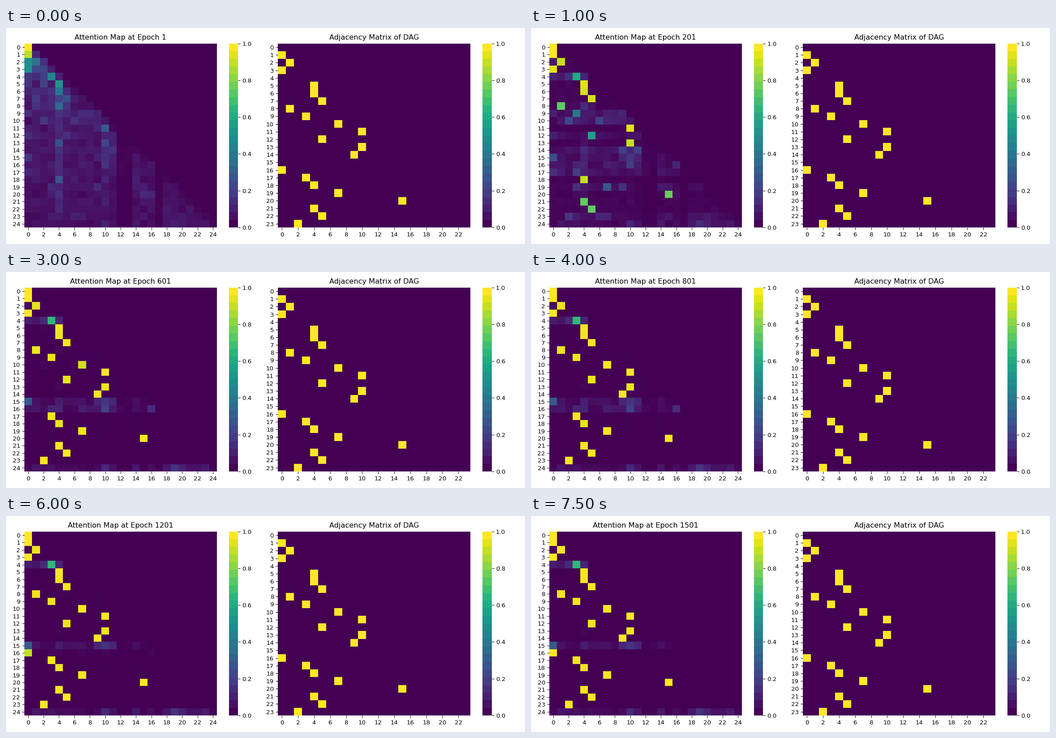
A matplotlib script for the animation above (8 s loop, 1159x483 px).

```python
import numpy as np
import matplotlib.pyplot as plt
from matplotlib.animation import FuncAnimation
from matplotlib.cm import ScalarMappable

W, H, DPI = 1159, 483, 96.6
STEP = 500
FRAMES = 16
SIZE = 25

plt.rcParams.update({"font.family": "DejaVu Sans", "font.size": 10})

# child node -> parent node
PARENT = {1: 0, 2: 1, 3: 0, 5: 4, 6: 4, 7: 5, 8: 1, 9: 3, 10: 7, 11: 10,
          12: 5, 13: 10, 14: 9, 16: 0, 17: 3, 18: 4, 19: 7, 20: 15,
          21: 4, 22: 5, 23: 2}

# seconds at which a slow row finds its parent; all others are quick
QUICK = 0.35
SLOW = {8: 0.75, 20: 0.75, 21: 0.75, 22: 0.75, 9: 1.1, 12: 1.0,
        14: 1.4, 17: 1.4, 19: 1.25, 23: 1.4, 10: 2.4, 16: 5.5}

# columns that draw more or less attention in every row
COLUMN_BIAS = {4: 0.7, 10: 0.4, 12: -2, 13: -2, 17: -2}

# (row, column) that gains weight while the row stays undecided
DRIFT = {(4, 4): 1.0, (15, 6): 1.0, (16, 9): 2.0}

rng = np.random.default_rng(7)
noise = rng.normal(0, 0.42, (SIZE, SIZE))
slack = rng.uniform(0, 0.07, SIZE)

bias = -np.eye(SIZE)
for col, value in COLUMN_BIAS.items():
    bias[:, col] += value


def spread(t):
    """Causal softmax over random scores that sharpen with time."""
    gain = 1 - np.exp(-t / 0.8)
    scores = noise * (1 + gain) + bias
    for cell, weight in DRIFT.items():
        scores[cell] += weight * gain
    weights = np.tril(np.exp(scores))
    return weights / weights.sum(axis=1, keepdims=True)


def attention(t):
    """Each row moves from its spread onto its parent along a sigmoid."""
    m = spread(t)
    for child, parent in PARENT.items():
        found = 1 / (1 + np.exp((SLOW.get(child, QUICK) - t) / 0.22))
        focus = found * (1 - slack[child] * np.exp(-t / 8))
        m[child] *= 1 - focus
        m[child, parent] += focus
    return m


# the tiny margin keeps the pixel size from rounding down
fig, axes = plt.subplots(1, 2, figsize=((W + 1e-6) / DPI, (H + 1e-6) / DPI),
                         dpi=DPI, facecolor="white")


def heatmap(ax, data, title):
    n = len(data)
    mesh = ax.pcolormesh(data, cmap="viridis", vmin=0, vmax=1)
    ax.set(xlim=(0, n), ylim=(n, 0))
    ax.set_xticks(np.arange(0, n, 2) + 0.5, range(0, n, 2))
    ax.set_yticks(np.arange(n) + 0.5, range(n))
    ax.spines[:].set_visible(False)
    bands = ScalarMappable(cmap=plt.get_cmap("viridis", 24))
    bands.set_clim(0, 1)
    bar = fig.colorbar(bands, ax=ax)
    bar.outline.set_linewidth(0)
    return mesh, ax.set_title(title, fontsize=12)


adjacency = np.zeros((24, 24))
for child, parent in PARENT.items():
    adjacency[child, parent] = 1

mesh, title = heatmap(axes[0], attention(0), "Attention Map at Epoch 1")
heatmap(axes[1], adjacency, "Adjacency Matrix of DAG")
fig.tight_layout()


def update(i):
    mesh.set_array(attention(i * STEP / 1000))
    title.set_text(f"Attention Map at Epoch {100 * i + 1}")
    return mesh, title


anim = FuncAnimation(fig, update, frames=FRAMES, interval=STEP, repeat=True,
                     repeat_delay=0, blit=False)
plt.show()
```
